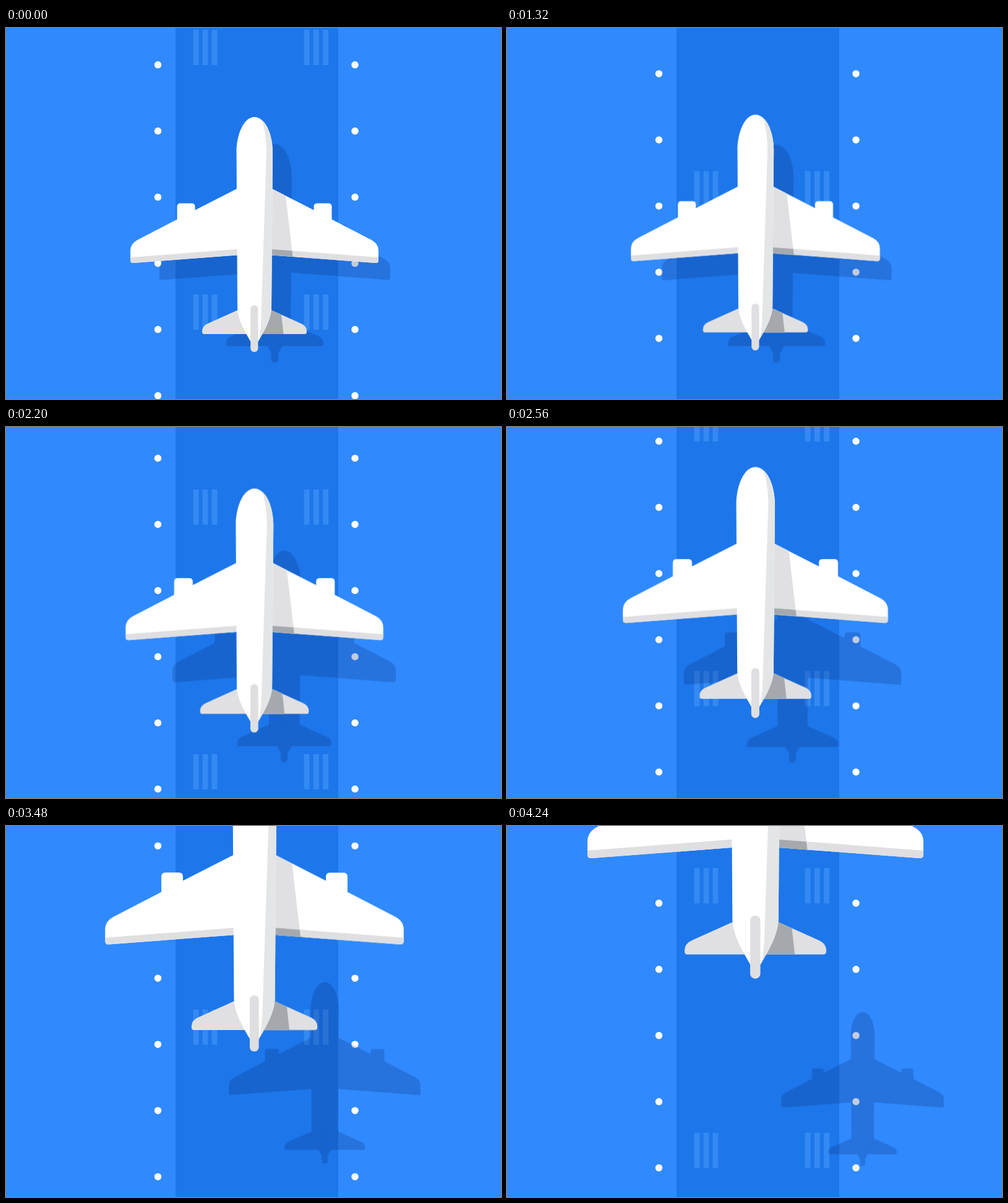
An HTML page for the animation above (4280 ms loop, 800 px wide and 600 px high).

```html
<!DOCTYPE html>
<html lang="en">
<head>
<meta charset="utf-8">
<title>Take-off</title>
<style>
  html, body { margin: 0; width: 100%; height: 100%; overflow: hidden; background: #308afd; }
  svg { display: block; width: 800px; height: 600px; }
  .white { fill: #fff; }
  .edge { fill: #dfdfe2; }
  .shade { fill: #e0e0e3; }
  .dark { fill: #a5a9ae; }
  .lights { fill: none; stroke: #fff; stroke-width: 11.5; stroke-linecap: round; stroke-dasharray: 0 107; }
</style>
</head>
<body>
<svg viewBox="0 0 800 600">
  <defs>
    <g id="tile">
      <path fill="#348af3" d="M302.5 0h9v57h-9z m15 0h9v57h-9z m15 0h9v57h-9z M481.5 0h9v57h-9z m15.3 0h9v57h-9z m15.3 0h9v57h-9z"/>
      <path class="lights" d="M245.5 56.5v322M564 56.5v322"/>
    </g>
    <path id="wing" d="M401.5 246L373 260L305.5 294.5V289Q305.5 283.5 300 283.5H282Q276.5 283.5 276.5 289V309.5L212 343Q201 349 201 360V375.500Q201 380.500 206 380L401.5 365.200Z"/>
    <path id="trim" d="M201 371L401.5 355.500V365.200L206 380Q201 380.500 201 375.500Z"/>
    <path id="stab" d="M401.5 444L326 478Q317 482 317 490V491.500Q317 495 320.500 495H401.5Z"/>
    <path id="body" d="M401.5 144C420 144 431 175 431 200L429 452C429 472 415 494 407 508H396C388 494 374 472 374 452L372.500 200C372.500 175 383 144 401.5 144Z"/>
    <rect id="fin" x="395.200" y="448.500" width="12.200" height="75.500" rx="6.100"/>
  </defs>

  <rect width="800" height="600" fill="#308afd"/>
  <rect x="274" width="263" height="600" fill="#1d77ea"/>

  <g id="ground">
    <use href="#tile" y="-428"/>
    <use href="#tile"/>
    <use href="#tile" y="428"/>
  </g>

  <g id="shadow" fill="#082c7d" opacity=".25">
    <use href="#wing"/>
    <use href="#wing" transform="translate(803) scale(-1 1)"/>
    <use href="#stab"/>
    <use href="#stab" transform="translate(803) scale(-1 1)"/>
    <use href="#body"/>
    <use href="#fin"/>
  </g>

  <g id="plane">
    <g>
      <use href="#wing" class="white"/>
      <use href="#trim" class="edge"/>
      <use href="#stab" class="shade"/>
    </g>
    <g transform="translate(803) scale(-1 1)">
      <use href="#wing" class="white"/>
      <use href="#trim" class="edge"/>
      <use href="#stab" class="shade"/>
    </g>
    <!-- fuselage shade falling on the right wing and stabiliser -->
    <path class="shade" d="M420 255L452 271.300L462.300 360.200L420 357Z"/>
    <path class="dark" d="M420 357L462.300 360.200L463.500 370L420 366.600Z M410 448L445 463.600L448.500 495H410Z"/>
    <use href="#body" class="white"/>
    <path fill="#e4e5e6" d="M414 149.500C425 158 431 181 431 200L429 452C429 470 417 490 409.500 503.500L412 480L421 200C421 182 418 163 414 149.500Z"/>
    <use href="#fin" class="edge"/>
  </g>
</svg>

<script>
  const STEP = 40, FRAMES = 107, SCROLL_FRAMES = 13;
  const ground = document.getElementById('ground');
  const shadow = document.getElementById('shadow');
  const plane = document.getElementById('plane');

  // Climb of the tail: time (ms), distance (px), speed (px/ms)
  const keys = [
    [880, 0, 0], [1800, 13, .032], [2560, 53.4, .0775],
    [3160, 113, .126], [3800, 211, .161], [4240, 277, .138]
  ];

  function climb(t) {
    if (t <= keys[0][0]) return 0;
    const i = Math.max(1, keys.findIndex(k => t <= k[0]));
    const [t0, d0, v0] = keys[i - 1], [t1, d1, v1] = keys[i];
    const span = t1 - t0, u = (t - t0) / span, w = 1 - u;
    return d0 * w * w * (1 + 2 * u) + d1 * u * u * (3 - 2 * u)
      + span * u * w * (v0 * w - v1 * u);
  }

  // Moves the tail end of the aircraft to x, y at the given scale
  function place(el, x, y, scale) {
    el.setAttribute('transform', `translate(${x} ${y}) scale(${scale}) translate(-401.5 -524)`);
  }

  function draw(ms) {
    const frame = Math.floor(ms / STEP + .2) % FRAMES;
    const d = climb(frame * STEP);
    ground.setAttribute('transform', `translate(0 ${3.1 + frame % SCROLL_FRAMES * 32.62})`);
    place(plane, 401.5, 524 - d, 1 + d * .001278);
    place(shadow, 434.5 + d * .506, 541.3 + d * .03, .93 - d * .000993);
  }

  const start = performance.now();
  function tick(now) {
    draw(Math.max(0, now - start));
    requestAnimationFrame(tick);
  }
  draw(0);
  requestAnimationFrame(tick);
</script>
</body>
</html>
```
